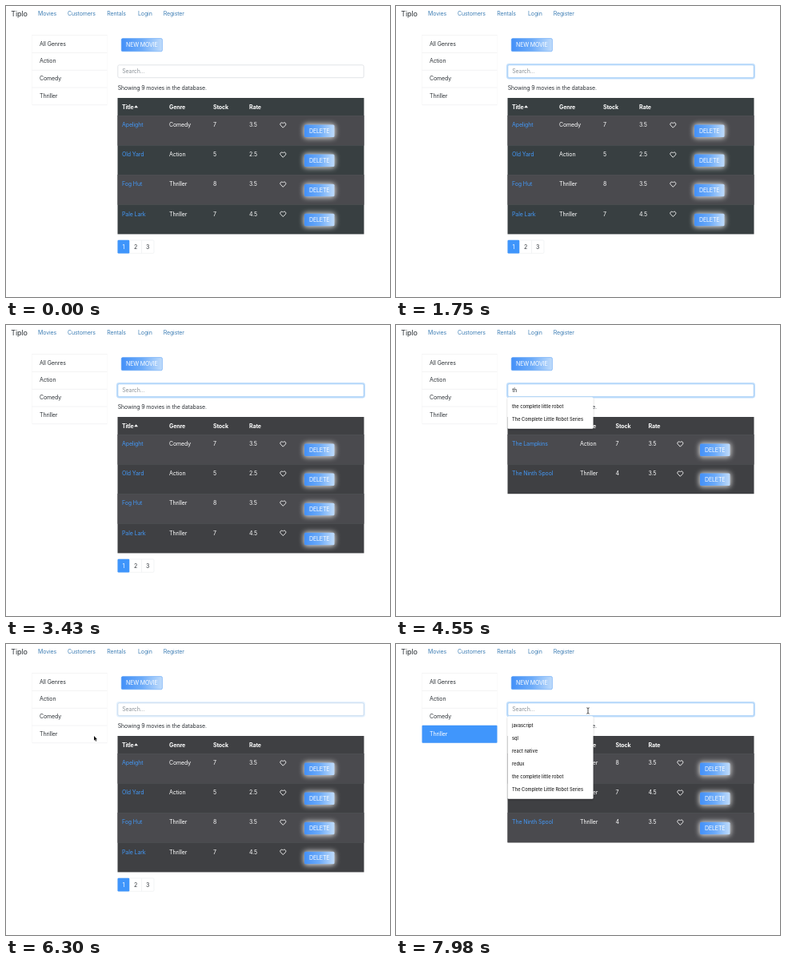
Recreate the animation shown at these times as an HTML page. Size 480 by 364 pixels, loop 8000 ms.

```html
<!DOCTYPE html>
<html lang="en">
<head>
<meta charset="utf-8">
<title>Movie list</title>
<style>
html, body { margin: 0; width: 100%; height: 100%; overflow: hidden; background: #fff; }
svg { display: block; width: 480px; height: 364px; font: 7px Inter, "Open Sans", sans-serif; letter-spacing: -.12px; fill: #2f3439; }
.brand { font-size: 9px; letter-spacing: -.1px; }
.nav { fill: #3f7fb5; }
.link { fill: #4397f5; }
.white { fill: #fff; }
.bold { font-weight: 700; fill: #fff; }
.hint { fill: #8b9298; }
.item { font-size: 5.7px; font-weight: 500; letter-spacing: 0; fill: #222; }
.mid { text-anchor: middle; }
</style>
</head>
<body>
<svg viewBox="0 0 480 364" xmlns="http://www.w3.org/2000/svg">
  <defs>
    <linearGradient id="blue">
      <stop offset="0" stop-color="#4390f8"/>
      <stop offset=".5" stop-color="#6cabf9"/>
      <stop offset="1" stop-color="#c0dcfb"/>
    </linearGradient>
    <filter id="glow" x="-40%" y="-80%" width="180%" height="260%"><feGaussianBlur stdDeviation="3.2"/></filter>
    <filter id="shade" x="-10%" y="-20%" width="120%" height="150%"><feDropShadow dx="0" dy="1" stdDeviation="1.3" flood-opacity=".28"/></filter>
  </defs>
  <g id="frame"></g>
  <g id="page"></g>
  <g id="field"></g>
  <g id="list"></g>
  <g id="pointer"></g>
</svg>
<script>
const LOOP = 8000;
const MOVIES = [
  ['Apelight', 'Comedy', 7, '3.5'],
  ['Old Yard', 'Action', 5, '2.5'],
  ['Fog Hut', 'Thriller', 8, '3.5'],
  ['Pale Lark', 'Thriller', 7, '4.5'],
  ['The Lampkins', 'Action', 7, '3.5'],
  ['The Ninth Spool', 'Thriller', 4, '3.5'],
];
const GENRES = ['All Genres', 'Action', 'Comedy', 'Thriller'];
const HISTORY = ['javascript', 'sql', 'react native', 'redux', 'the complete little robot', 'The Complete Little Robot Series'];

// Column positions: genre, stock, rate, heart, button
const VIEWS = {
  all: { rows: [0, 1, 2, 3], cols: [204, 259, 304, 342, 373], count: 9 },
  a: { rows: [0], cols: [200, 256, 301.5, 341, 371.5], count: 1 },
  t: { rows: [4, 5], cols: [230, 274.5, 315.5, 351, 380], count: 2 },
  thriller: { rows: [2, 3, 5], cols: [230, 274.5, 315.5, 351, 380], count: 3 },
};
const QUERY = [[0, ''], [1820, 'a'], [2660, ''], [3500, 't'], [4130, 'th'], [4690, 't'], [4830, '']];
const CARET = [[0, 0], [910, 1], [1470, 0], [1820, 1], [2240, 0], [2660, 1], [3150, 0], [3500, 1], [3850, 0],
  [4130, 1], [4410, 0], [4690, 1], [5180, 0], [5460, 1], [5900, 0], [7560, 1], [7980, 0]];
const FOCUS = [[910, 0], [1060, 1], [6230, 1], [6360, 0], [7540, 0], [7640, 1]];
const PATH = [[5460, 240, 83], [5900, 128, 92], [6230, 110, 115], [6510, 110, 115], [6790, 240, 76],
  [6980, 240, 76], [7210, 240, 83.5]];

const $ = id => document.getElementById(id);
const last = (keys, t) => keys.filter(k => k[0] <= t).pop()[1];
const ease = x => x * x * (3 - 2 * x);

function tween(keys, t, i) {
  const n = keys.findIndex(k => k[0] > t);
  if (n === 0) return keys[0][i];
  if (n < 0) return keys[keys.length - 1][i];
  const [a, b] = [keys[n - 1], keys[n]];
  return a[i] + (b[i] - a[i]) * ease((t - a[0]) / (b[0] - a[0]));
}

const text = (x, y, s, cls = '') => `<text x="${x}" y="${y}" class="${cls}">${s}</text>`;
const rect = (x, y, w, h, fill, more = '') => `<rect x="${x}" y="${y}" width="${w}" height="${h}" fill="${fill}" ${more}/>`;
const line = (x, y, w, color) => rect(x, y, w, .6, color);
const heart = (x, y) => `<path transform="translate(${x} ${y})" d="M4 6.8L1 3.8C-.7 1.8 2.2-1 4 1.4C5.8-1 8.7 1.8 7 3.8Z" fill="none" stroke="#fff" stroke-width=".9" stroke-linejoin="round"/>`;

function button(x, y) {
  return rect(x - 1, y - 1, 39.5, 18, '#fff', 'rx="4" opacity=".8" filter="url(#glow)"') +
    rect(x, y, 37.5, 15.5, 'url(#blue)', 'rx="1.5"') + text(x + 6, y + 10.4, 'DELETE', 'white');
}

function sidebar(active) {
  return GENRES.map((name, i) => {
    const y = 36.3 + i * 21.8, on = i === active;
    return (on ? rect(32.5, y, 94, 22, '#4096fc', 'rx="1"') : '') + text(42, y + 13.2, name, on ? 'white' : '');
  }).join('');
}

function table(view, dark) {
  const { rows, cols } = view;
  const [genre, stock, rate, like, del] = cols;
  let out = rect(139.5, 115, 308, 22 + rows.length * 37.1, dark);
  out += text(145, 129, 'Title', 'bold') + '<path d="M160.2 127.2l2.4-2.9l2.4 2.9z" fill="#fff"/>';
  out += ['Genre', 'Stock', 'Rate'].map((s, i) => text(cols[i], 129, s, 'bold')).join('');
  rows.forEach((id, i) => {
    const y = 137 + i * 37.1, [title, kind, left, score] = MOVIES[id];
    if (i % 2 === 0) out += rect(139.5, y, 308, 37.1, '#4a4a4e');
    out += line(139.5, y, 308, '#505256') + text(145, y + 14.2, title, 'link') + text(genre, y + 14.2, kind, 'white') +
      text(stock, y + 14.2, left, 'white') + text(rate, y + 14.2, score, 'white') + heart(like + .3, y + 8.4);
  });
  return out + rows.map((_, i) => button(del, 148.5 + i * 37.1)).join('');
}

function pages() {
  return rect(139.5, 293, 45.5, 16.3, '#fff', 'rx="1.5" stroke="#e9ecef" stroke-width=".6"') +
    rect(169.3, 293, .6, 16.3, '#e9ecef') + rect(139.5, 292.8, 14.8, 16.7, '#3f95fb', 'rx="1.2"') +
    [1, 2, 3].map(n => text(131.8 + n * 15.1, 303.8, n, n === 1 ? 'mid white' : 'mid')).join('');
}

function field(query, focus, caret) {
  const mix = (a, b) => Math.round(a + (b - a) * focus);
  const border = `rgb(${mix(212, 134)},${mix(217, 190)},${mix(222, 245)})`;
  return rect(138.8, 72.8, 309.4, 17.9, 'none', `rx="2.6" stroke="#bfddfb" stroke-width="1.6" opacity="${focus}"`) +
    rect(139.8, 73.8, 307.4, 15.9, '#fff', `rx="1.8" stroke="${border}" stroke-width=".7"`) +
    text(145.2, 84.4, query || 'Search...', query ? '' : 'hint') +
    (caret ? rect(145.2 + [0, 4.1, 6.6][query === 't' ? 0 : query.length] + (query === 't' ? 2.7 : 0), 77.3, .6, 8.6, '#222') : '');
}

function suggestions(items) {
  if (!items.length) return '';
  return rect(139.5, 90.3, items[0] === 'api' ? 85.5 : 107, 7.5 + items.length * 16, '#fff', 'rx="1.5" filter="url(#shade)"') +
    items.map((s, i) => text(145, 104.2 + i * 16.05, s, 'item')).join('');
}

function pointer(t) {
  if (t < PATH[0][0]) return '';
  const x = tween(PATH, t, 1), y = tween(PATH, t, 2);
  const inField = x > 140 && y > 73 && y < 90;
  const shape = inField
    ? '<path d="M-1.7-3.7Q0-3.7 0-2.6Q0-3.7 1.7-3.7M0-2.6V2.6M-1.7 3.7Q0 3.7 0 2.6Q0 3.7 1.7 3.7" fill="none" stroke="#222" stroke-width=".8"/>'
    : '<path d="M0 0V5.8L1.3 4.6L2.2 6.7L3.2 6.3L2.3 4.2H4.1Z" fill="#111" stroke="#fff" stroke-width=".5" paint-order="stroke"/>';
  return `<g transform="translate(${x.toFixed(2)} ${y.toFixed(2)})">${shape}</g>`;
}

const drawn = {};
function put(id, html) {
  if (drawn[id] !== html) $(id).innerHTML = drawn[id] = html;
}

function draw(t) {
  const query = last(QUERY, t), picked = t >= 6370;
  const view = picked ? VIEWS.thriller : VIEWS[query[0] || 'all'];
  const items = t >= 7350 ? HISTORY : query === 'a' ? ['api'] : query ? HISTORY.slice(4) : [];
  put('page', sidebar(picked ? 3 : -1) + text(139.7, 105.2, `Showing ${view.count} movies in the database.`) +
    table(view, t < 1820 ? '#383f41' : '#3f4043') + (view === VIEWS.all ? pages() : ''));
  put('field', field(query, tween(FOCUS, t, 1), last(CARET, t)));
  put('list', suggestions(items));
  put('pointer', pointer(t));
}

put('frame', text(6.2, 13, 'Tiplo', 'brand') +
  [[40, 'Movies'], [77, 'Customers'], [126.3, 'Rentals'], [165, 'Login'], [196.7, 'Register']]
    .map(([x, s]) => text(x, 12.4, s, 'nav')).join('') +
  [0, 1, 2, 3, 4].map(i => line(32.5, 36.3 + i * 21.8, 94, '#ececed')).join('') +
  rect(32.5, 36.3, .5, 87.2, '#f1f1f2') + rect(126, 36.3, .5, 87.2, '#f6f6f7') +
  rect(144.2, 40.6, 51.2, 16.2, 'url(#blue)', 'rx="1.6" stroke="#62a4f5" stroke-width=".6"') +
  text(150, 51.3, 'NEW MOVIE', 'white'));

const start = performance.now();
function tick() {
  draw((performance.now() - start) % LOOP);
  requestAnimationFrame(tick);
}
tick();
</script>
</body>
</html>
```
